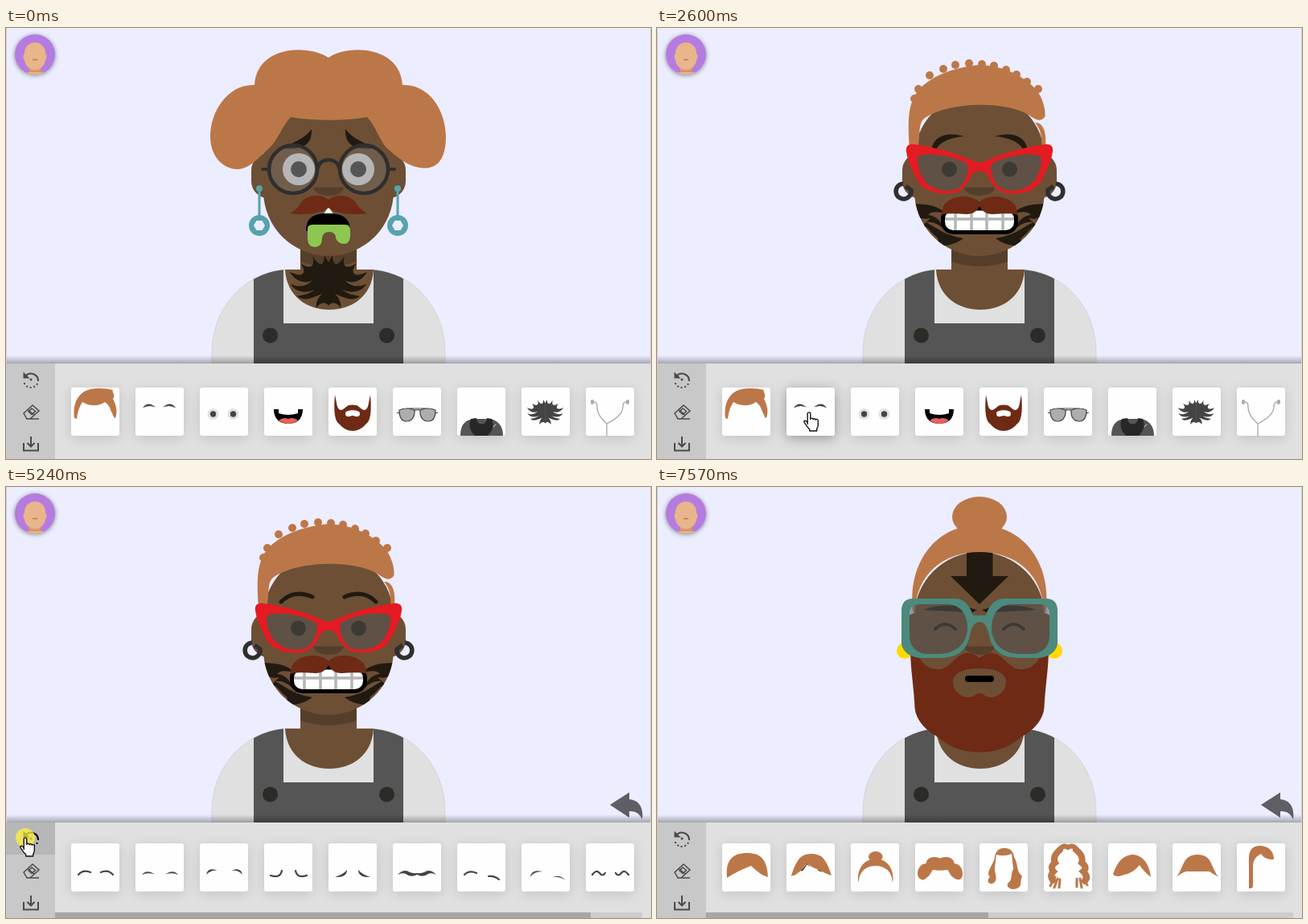
Animation, 802 px wide and 537 px high, one loop 8570 ms. Source, as an HTML page:

```html
<!DOCTYPE html>
<html lang="en">
<head>
<meta charset="utf-8">
<title>Avatar maker</title>
<style>
html, body { margin: 0; width: 100%; height: 100%; overflow: hidden; background: #ecedff; }
svg { display: block; width: 802px; height: 537px; }
</style>
</head>
<body>
<svg id="stage" viewBox="0 0 802 537" width="802" height="537" xmlns="http://www.w3.org/2000/svg">
  <defs>
    <filter id="blur" x="-50%" y="-50%" width="200%" height="200%"><feGaussianBlur stdDeviation="8"/></filter>
    <filter id="soft" x="-30%" y="-30%" width="160%" height="160%"><feGaussianBlur stdDeviation="2.5"/></filter>
    <linearGradient id="lip" x1="0" y1="0" x2="0" y2="1">
      <stop offset="0" stop-color="#000" stop-opacity="0"/><stop offset="1" stop-color="#000" stop-opacity=".3"/>
    </linearGradient>
    <clipPath id="torso"><path d="M256 418V405C256 345 300 303 350 301H453C503 303 546 345 546 405V418Z"/></clipPath>
    <clipPath id="neckline"><path d="M366 278H436V301H457C455 335 429 351 402 351S349 335 347 301H366Z"/></clipPath>
    <clipPath id="skull"><rect x="320" y="81" width="162" height="203" rx="81"/></clipPath>
    <clipPath id="badge"><circle cx="36" cy="33" r="25"/></clipPath>
  </defs>
  <rect width="802" height="537" fill="#ecedff"/>
  <circle cx="36" cy="34" r="26" fill="#555" opacity=".5" filter="url(#soft)"/>
  <circle cx="36" cy="33" r="25" fill="#b57be0"/>
  <g clip-path="url(#badge)" fill="#e8b68a">
    <rect x="21.5" y="31" width="29" height="10" rx="4.5"/>
    <path d="M29 46H43V55H29Z" fill="#d79f73"/>
    <path d="M24 59Q28 53 30 53H42Q45 53 48 59Z"/>
    <path d="M27 54H45" stroke="#d2694f"/>
    <rect x="23" y="18" width="26" height="34" rx="13"/>
    <path d="M33 39.5H39" stroke="#b97d58" stroke-width="1.3"/>
  </g>
  <g id="face"></g>
  <rect y="408" width="802" height="10" fill="url(#lip)"/>
  <g id="back"><path d="M751 396L775 380.500V389C788 390 793 401 791 414C787 406 783 404 775 404V412Z" fill="#5e5e64"/></g>
  <rect y="418" width="802" height="119" fill="#e0e0e0"/>
  <g id="panel"></g>
  <rect y="418" width="61" height="119" fill="#c8c8c8"/>
  <rect id="hot" y="418" width="61" height="40" fill="#b7b7b7"/>
  <g fill="none" stroke="#4a4a4a" stroke-width="2">
    <g id="redo">
      <path d="M24 434A9 9 0 0 1 40 440"/>
      <path d="M39 443A9 9 0 0 1 22 440" stroke-dasharray="2 2.600"/>
      <path d="M21.500 428.500V436.500H29.500Z" fill="#4a4a4a" stroke="none" class="tip"/>
      <circle cx="31" cy="438" r="1.500" fill="#4a4a4a" stroke="none" class="tip"/>
    </g>
    <g stroke-width="1.500">
      <path d="M22 480L33 470L41 477L30 487H26ZM27 475.500L35.500 482.500M25 487H41"/>
      <path d="M32 474L36.500 477.500L32 481.500L28 478Z"/>
    </g>
    <path d="M22 517V526.500H40V517M31 509V521M26.500 517L31 521.500L35.500 517"/>
  </g>
  <path d="M.5 0V418M801.500 0V418" stroke="#cfcfd6"/>
  <circle id="press" r="12" fill="#fff03c" opacity=".75"/>
  <path id="hand" fill="#fff" stroke="#111" stroke-width="1.400" stroke-linejoin="round"
    d="M5 15V2.200a1.800 1.800 0 0 1 3.600 0V9q.2-1.500 1.600-1.400t1.700 1.600q.3-1.200 1.600-1t1.600 1.500q.4-1 1.500-.8t1.500 1.600V16q0 3-1.600 5V23.500H7.500V21.500Q4 18 2 14.500Q0 12 1 11Q2.500 10 5 13Z"/>
</svg>
<script>
const LOOP = 8570;
const INK = '#211a11', SKIN = '#6d4f35', SHADE = '#553f2b', HAIR = '#bc7748', BEARD = '#6e2a14', GREY = '#444';
const $ = id => document.getElementById(id);
const fill = (d, c, more = '') => `<path d="${d}" fill="${c}" ${more}/>`;
const line = (d, c, w) => `<path d="${d}" fill="none" stroke="${c}" stroke-width="${w}" stroke-linecap="round"/>`;
const dot = (x, y, r, c) => `<circle cx="${x}" cy="${y}" r="${r}" fill="${c}"/>`;
const pair = (s, w = 802) => `${s}<g transform="translate(${w})scale(-1 1)">${s}</g>`;
const mini = (s, k, x, y) => `<g transform="translate(${x} ${y})scale(${k})">${s}</g>`;

const nubs = [[320, 88], [325, 76], [339, 59], [356, 51], [371, 46], [388, 44], [404, 45], [419, 47], [434, 52], [447, 58], [460, 67], [474, 76]];

const hair = {
  puffs: fill('M401 37C375 20 312 22 309 71C275 70 254 105 254 135C254 160 270 176 288 176C304 175 313 162 326 151C338 141 343 122 354 111C385 116 420 116 449 111C460 122 464 140 474 150C488 162 500 173 518 174.500C540 176 547 158 547 135C546 100 525 70 493 71C490 22 425 20 401 37Z', HAIR),
  bun: `<ellipse cx="401" cy="37" rx="34" ry="25" fill="${HAIR}"/>` +
    fill('M318.500 156C311 100 342 48 401 47C460 48 491 100 483.500 156H481C480 108 445 81 401 81S322 108 321 156Z', HAIR),
  crop: nubs.map(p => dot(p[0], p[1], 5, HAIR)).join('') +
    fill('M314 151C312 125 312 105 317 92C322 75 345 52 400 46C440 47 465 68 474 80C481 92 483 102 482.500 110C479 116 474 116 466 111C440 91 365 90 332 113C324 120 328 135 324 151ZM470 118C480 117 485 130 483 148H478C479 136 477 126 470 118Z', HAIR),
  quiff: fill('M440 121L466 137L483 152H456Z', SHADE) +
    fill('M281 114C297 120 303 108 312 90C325 55 368 42 407 60C445 50 489 75 489 122C489 135 486 145 484 152C478 142 471 135 458 131C438 125 422 118 417 100C415 115 407 127 397 137C396 128 399 121 396 112C391 120 390 130 383 139C370 160 348 176 317 178V167C300 173 287 165 282 150C278 138 278 125 281 114Z', HAIR),
  fringe: fill('M366 97C364 118 345 135 326 150H344C360 134 367 118 369 110L392 126ZM443 135L470 160L440 148Z', SHADE) +
    fill('M271 185C285 140 300 95 330 65C350 47 375 42 398 42C425 42 455 50 473 68C500 100 515 140 527 179C505 174 485 165 462 152C430 136 390 125 365 97C362 115 340 140 325 155C308 168 292 182 278 181Z', HAIR)
};

const brow = {
  taper: pair(fill('M380 126C372 136 365 139 357 143L346 150C368 152 381 146 380 126Z', INK)),
  sad: pair(line('M337 145.500C352 153 373 149 378 128', INK, 5.5)),
  arch: pair(fill('M341 151C346 131 365 130 382 135C365 136 352 142 347 151Z', INK)),
  lift: pair(line('M342 143Q358 127 381 137', INK, 5)),
  angry: pair(fill('M331 153C350 145 378 147 398 153L391 157C378 155 350 155 331 153Z', INK))
};

const eyes = {
  wide: pair(dot(364, 176, 20, '#d8d8d8') + dot(364, 176, 10, GREY)),
  dots: pair(dot(363.5, 176, 9.5, INK)),
  shut: pair(line('M346 177Q358.500 165 371 177', INK, 4))
};

const grid = [371, 391, 410, 430].map(x => `M${x} 229V252`).join('');
const mouth = {
  slime: fill('M394 233L401 223L408 233Z', '#fff') +
    fill('M373 253C373 238 380 231 401 231S428 240 428 253Z', '#000') +
    fill('M375 250Q375 245 382 245H422Q428 245 428 252V260Q427 269 420 269T410 262Q410 254 402 254T393 262Q393 273 384 273T375 262Z', '#8cc751'),
  smile: line('M382 230C386 246.500 416 246.500 420 230', '#000', 5.5),
  teeth: '<rect x="355.500" y="225" width="91" height="29.500" rx="13" fill="#fff"/>' +
    `<path d="${grid}M358 238H444" stroke="#b5b5b5" stroke-width="3.500"/>` +
    '<rect x="355.500" y="225" width="91" height="29.500" rx="13" fill="none" stroke="#000" stroke-width="5"/>',
  flat: '<rect x="383" y="235" width="36" height="8" rx="4"/>'
};

const beard = {
  curl: pair(fill('M401 214C392 206 373 207 366 219C362 226 357 228 353 231C370 233 391 232 401 224Z', BEARD)),
  brush: pair(fill('M401 217C392 208 370 207 358 219C354 224 355 229 353 233C365 230 375 232 385 232C393 232 398 228 401 222Z', BEARD)),
  full: fill('M315 205C316 235 319 245 320.500 275C322 290 332 300 342 307C355 315 365 326 385 329Q401 332 417 329C437 326 447 315 460 307C470 300 480 290 481.500 275C483 245 486 235 487 205L476 212C470 224 457 230 446 226C433 220 428 207 416 207C409 207 405 210 401 213C397 210 393 207 386 207C374 207 369 220 356 226C345 230 332 224 326 212ZM368 243C368 230 385 226 401 226S434 230 434 243C434 256 422 262 415 262C407 262 407 257 401 257S395 262 387 262C380 262 368 256 368 243Z', BEARD, 'fill-rule="evenodd"')
};

const lens = (d, c, a) => fill(d, c, `opacity="${a}"`);
const CAT = 'M325 160C335 154 372 160 385 169C390 174 384 192 376 199C362 207 340 202 331 188C326 178 322 168 325 160Z';
const BOX = 'M314 158Q315 146 328 146H362C378 147 386 160 386 175C386 195 372 208 350 208H335C322 207 314 198 314 185Z';
const glasses = {
  round: pair('<circle cx="357" cy="176" r="30" fill="#777" fill-opacity=".35" stroke="#2e2e2e" stroke-width="4.500"/>' + line('M319 176H326', '#2e2e2e', 4)) +
    line('M388 174C390 161 412 161 414 174', '#2e2e2e', 4.5),
  cat: pair(lens(CAT, '#555', .55) + fill('M401.500 168C385 164 370 152 320 145C312 144 309 148 310 154C312 168 318 178 324 190C332 204 350 208 368 206C382 203 388 190 392 182Q396 178 401.500 178Z' + CAT, '#e41b22', 'fill-rule="evenodd"')),
  boxy: pair(lens(BOX, '#555', .55) + fill('M304 153Q305 139 318 139H370C383 139 390 150 393 160H401.500V168C395 168 391 174 389 185C385 203 375 213 350 213H330C315 213 305 205 304 195Z' + BOX, '#4b8a7d', 'fill-rule="evenodd"'))
};

const ears = {
  drop: pair(dot(315, 200, 4, '#56a3ad') + line('M315 200V235', '#56a3ad', 3) +
    fill('M302 246A13 13 0 0 1 328 246A13 13 0 0 1 302 246ZM308 246L311.500 252H318.500L322 246L318.500 240H311.500Z', '#56a3ad', 'fill-rule="evenodd"')),
  hoop: pair('<path d="M306 194A9.500 9.500 0 1 0 316 202L309 197" fill="none" stroke="#2f2f2f" stroke-width="5.500"/>'),
  stud: pair(dot(308, 204, 10, '#ffd900'))
};

const vine = c => pair(fill('M401.500 293L396 283C396 295 391 300 381 284C385 297 379 302 366 293C375 305 370 312 353 304C359 315 372 320 381 314C373 323 363 323 354 319C360 329 371 331 384 326C376 332 368 333 362 334C371 342 384 335 393 331C387 337 385 343 386 349C391 341 397 341 401.500 346Z', c));
const ink = {
  vine: `<g clip-path="url(#neckline)">${vine(INK)}</g>`,
  arrow: fill('M385 80H417.500V111H437L401 146L365 111H385Z', INK),
  tear: fill('M356 183C360 192 365 195 365 201A9 9 0 0 1 347 201C347 195 352 192 356 183Z', '#8ed0f7'),
  cheek: `<g clip-path="url(#skull)">${pair(fill('M318 219C335 219 352 222 358 231C348 229 342 228 337 233C347 234 353 240 356 250C349 244 343 241 334 242C346 247 355 258 381 262C372 269 358 274 340 270C350 268 353 264 346 259C340 254 338 248 330 246L340 237C334 238 330 238 326 236Z', INK))}</g>`
};

const BODY = 'M256 418V405C256 345 300 303 350 301H453C503 303 546 345 546 405V418Z';
const wear = {
  bib: fill(BODY, '#e0e0e0', 'stroke="#cacaca" stroke-width=".6"') +
    fill('M308 290H345V368H457V290H494V418H308Z', '#555', 'clip-path="url(#torso)"') +
    dot(328.5, 383, 9.5, '#2b2b28') + dot(473.5, 383, 9.5, '#2b2b28') +
    fill('M347 301C349 335 375 351 402 351S455 335 457 301Z', SKIN),
  vee: fill(BODY, '#555') + fill('M347.500 301H455.500L401.500 356Z', SKIN)
};

const face = o => wear[o.wear] +
  fill('M366 265H436V302H366Z', SKIN) + fill('M366 265H436V291Q401 303 366 291Z', SHADE) +
  `<rect x="305" y="156" width="192" height="56" rx="21" fill="${SKIN}"/>` +
  (o.ink.includes('vine') ? ink.vine : '') + ears[o.ears] +
  `<rect x="320" y="81" width="162" height="203" rx="81" fill="${SKIN}"/>` +
  fill('M382 198.500H420C418 212.500 384 212.500 382 198.500Z', SHADE) +
  o.ink.filter(k => k !== 'vine').map(k => ink[k]).join('') +
  eyes[o.eyes] + brow[o.brow] + mouth[o.mouth] + (beard[o.beard] || '') + hair[o.hair] + (glasses[o.glasses] || '');

const first = { wear: 'bib', ears: 'drop', ink: ['vine'], eyes: 'wide', brow: 'taper', mouth: 'slime', beard: 'curl', hair: 'puffs', glasses: 'round' };
const second = { wear: 'bib', ears: 'hoop', ink: [], eyes: 'dots', brow: 'arch', mouth: 'smile', hair: 'fringe' };
const third = { wear: 'vee', ears: 'hoop', ink: ['arrow', 'tear'], eyes: 'dots', brow: 'sad', mouth: 'smile', hair: 'bun' };
const fourth = { wear: 'bib', ears: 'hoop', ink: ['cheek'], eyes: 'dots', brow: 'arch', mouth: 'teeth', beard: 'brush', hair: 'crop', glasses: 'cat' };
const fifth = { wear: 'bib', ears: 'stud', ink: ['arrow'], eyes: 'shut', brow: 'angry', mouth: 'flat', beard: 'full', hair: 'quiff', glasses: 'boxy' };
const looks = [
  [0, first], [900, second], [1530, third], [1920, fourth],
  [3610, { ...fourth, brow: 'sad' }], [4620, { ...fourth, brow: 'lift' }],
  [5320, fifth], [6630, { ...fifth, hair: 'fringe' }], [6940, { ...fifth, hair: 'bun' }]
].map(([t, o]) => [t, face(o)]);

// Card pictures, each on a 60 by 60 square
const thin = (d, w = 2.2) => line(d, GREY, w);
const both = d => pair(thin(d), 61);
const cards = {
  main: [
    fill('M4 38C2 22 7 6 24 2C32 0 46 1 52 3C50 6 56 8 52 14C56 22 58 30 55 38C53 38 52 34 50 30C48 24 46 21 42 18C32 25 20 22 14 18C9 26 8 32 7 39Z', HAIR),
    pair(fill('M9 25.500Q15 16 25 24.500Q16 21 9 25.500Z', GREY), 59),
    [16.5, 41.5].map(x => dot(x, 33, 7, '#dfe4df') + dot(x, 33, 3.7, GREY)).join(''),
    fill('M12 27H48C48 40 40 45 30 45S12 40 12 27Z', '#000') + fill('M18 27H42V32Q30 36 18 32Z', '#fff') + fill('M18 41Q24 36 30 39Q36 36 42 41Q30 49 18 41Z', '#e8605c'),
    fill('M8 9C11 22 10 26 15 28C20 28 22 22 26 22Q30 21 34 22C38 22 40 28 45 28C50 26 49 22 52 9C54 30 52 42 47 45C42 51 36 54 30 54S18 51 13 45C8 42 6 30 8 9ZM21 32C21 27 39 27 39 32C39 38 34 36 30 35C26 36 21 38 21 32Z', BEARD, 'fill-rule="evenodd"'),
    pair('<path d="M8 28Q17 24 27 28C28 37 23 42 17 42C10 42 8 36 8 28ZM8 32L5 31M26 29Q28 27 30.500 28M16 26H30.500" fill="#adadad" stroke="#444" stroke-width="1.200"/>', 61),
    fill('M4 60C4 44 12 40 21 39H40C49 40 57 46 57 60Z', '#555') + fill('M17 39L24 38C24 48 37 48 37 38L43 39Q48 50 38 60H22Q12 50 17 39Z', '#272727') + line('M45 49L48 46', '#ddd', 1),
    mini(vine(GREY), .47, -159, -118),
    line('M9 18Q14 17 14 24C14 34 21 40 26 45V60M51 18Q46 17 46 24C46 34 34 41 26 45', '#a8a8a8', 1.3) + line('M8 17V19M52 17V19', '#aaa', 4)
  ],
  brows: [
    both('M9 39Q15 32 24 36'),
    pair(fill('M8 39Q14 32 24 38.500Q15 36 8 39Z', GREY), 61),
    pair(fill('M8 39Q10 29 22 34Q13 33 8 39Z', GREY), 61),
    both('M8 40Q20 44 22 34'),
    pair(fill('M8 42Q18 39 23 33Q23 43 8 42Z', GREY), 60),
    pair(fill('M6 39Q14 31 21 36Q27 38 30 37V39Q22 43 16 38Q12 36 6 39Z', GREY), 60),
    thin('M9 39Q15 33 24 37M39 41Q46 40 52 45'),
    fill('M11 42Q12 32 26 35Q15 35 11 42ZM39 42Q47 38 55 46Q47 41 39 42Z', GREY),
    both('M8 39Q13 32 17 37T24 37')
  ],
  hair: [
    fill('M6 42C4 20 14 12 31 12S56 20 57 42Q48 40 36 28Q20 34 6 43Z', HAIR),
    mini(hair.fringe, .196, -47.3, 4.8),
    mini(hair.bun, .26, -73.5, 7),
    mini(hair.puffs, .191, -45.5, 11.8),
    fill('M19 17C20 2 42 2 43 17C49 27 45 34 53 41C50 48 53 54 47 56C40 59 33 55 35 50C42 45 38 39 42 32L40 13Q30 17 21 14L19 30C18 36 24 45 18 49C13 53 7 47 13 42C7 36 18 26 19 17Z', HAIR),
    line('M20 8Q10 17 14 24Q7 29 12 35Q7 40 11 46M40 8Q50 16 47 24Q55 30 49 35Q56 42 51 47', HAIR, 8) + line('M14 42L8 53M17 44L13 55M20 45L19 55M41 44V54M45 44L47 55M49 44L54 52', HAIR, 3) + line('M19 8Q24 1 30 5Q37 1 41 8', HAIR, 6),
    fill('M6 39C11 23 19 14 31 14C43 15 51 25 53 42Q45 36 39 27Q31 37 20 39Q11 43 6 39Z', HAIR),
    fill('M5 42C15 28 13 14 31 14S47 28 57 42Q50 38 46 35H17Q10 37 5 42Z', HAIR),
    fill('M15 56V20C15 6 21 3 30 3C40 4 46 10 46 20Q35 21 30 13Q20 18 20 28V54Q18 57 15 56Z', HAIR)
  ]
};

const panels = [[0, 'main'], [2770, 'brows'], [5320, 'main'], [5940, 'hair']];
const presses = [[750, 900], [1360, 1530], [1830, 1920], [2690, 2770], [3460, 3610], [4540, 4620], [5240, 5320], [5790, 5940], [6480, 6630], [6860, 6940]];

// Pointer tip: time, x, y
const track = [
  [200, 472, 540], [720, 24, 437], [2000, 24, 437], [2520, 189, 479], [2770, 189, 479], [3050, 262, 484], [3320, 355, 480],
  [3700, 355, 480], [4030, 262, 484], [4240, 154, 479], [4390, 123, 475], [4470, 106, 480], [4680, 106, 480], [5120, 24, 437], [5340, 24, 437],
  [5700, 106, 480], [6250, 106, 480], [6470, 189, 480], [6660, 189, 480], [6770, 262, 480],
  [7270, 265, 480], [7570, 592, 540]
];

const latest = (list, t) => list.filter(e => e[0] <= t).pop()[1];

function pointer(t) {
  const i = track.findIndex(k => k[0] > t);
  if (i < 1) return null;
  const [ta, xa, ya] = track[i - 1], [tb, xb, yb] = track[i];
  const u = (t - ta) / (tb - ta), e = u * .5 + u * u * (3 - 2 * u) * .5;
  return [xa + (xb - xa) * e, ya + (yb - ya) * e];
}

function panel(name, hover) {
  const top = name === 'main' ? 448 : 444;
  const items = cards[name].map((art, i) =>
    `<g transform="translate(${81 + i * 80} ${top})"><rect y="3" width="60" height="60" rx="3" opacity="${i === hover ? .34 : .13}" filter="url(#blur)"/>` +
    `<rect width="60" height="60" rx="3" fill="#fefefe"/>${art}</g>`).join('');
  if (name === 'main') return items;
  const end = name === 'brows' ? 727 : 412;
  return items + fill('M61 530H791V537H61Z', '#cdcdcd') + fill(`M61 530H${end}V537H61Z`, '#a7a7a7');
}

const shown = {};
function put(id, html) {
  if (shown[id] !== html) $(id).innerHTML = shown[id] = html;
}

function render(t) {
  const name = latest(panels, t), p = pointer(t), q = pointer(t - 70);
  const slot = q && q[1] > 444 && q[1] < 508 && q[0] > 80 ? (q[0] - 81) / 80 : -1;
  const hover = slot >= 0 && slot % 1 < .75 ? Math.floor(slot) : -1;
  put('face', latest(looks, t));
  put('panel', panel(name, hover));
  $('back').style.display = name === 'main' ? 'none' : '';

  const hot = p && p[0] < 61 && p[1] < 458;
  $('hot').style.display = hot ? '' : 'none';
  $('redo').setAttribute('stroke', hot ? '#000' : '#4a4a4a');
  for (const e of $('redo').querySelectorAll('.tip')) e.setAttribute('fill', hot ? '#000' : '#4a4a4a');

  const down = p && presses.some(([a, b]) => t >= a && t < b);
  $('press').style.display = down ? '' : 'none';
  $('hand').style.display = p ? '' : 'none';
  if (!p) return;
  $('press').setAttribute('cx', p[0]);
  $('press').setAttribute('cy', p[1]);
  $('hand').setAttribute('transform', `translate(${p[0] - 6.8} ${p[1] - .5})`);
}

const start = performance.now();
function tick() {
  render((performance.now() - start) % LOOP);
  requestAnimationFrame(tick);
}
tick();
</script>
</body>
</html>
```
